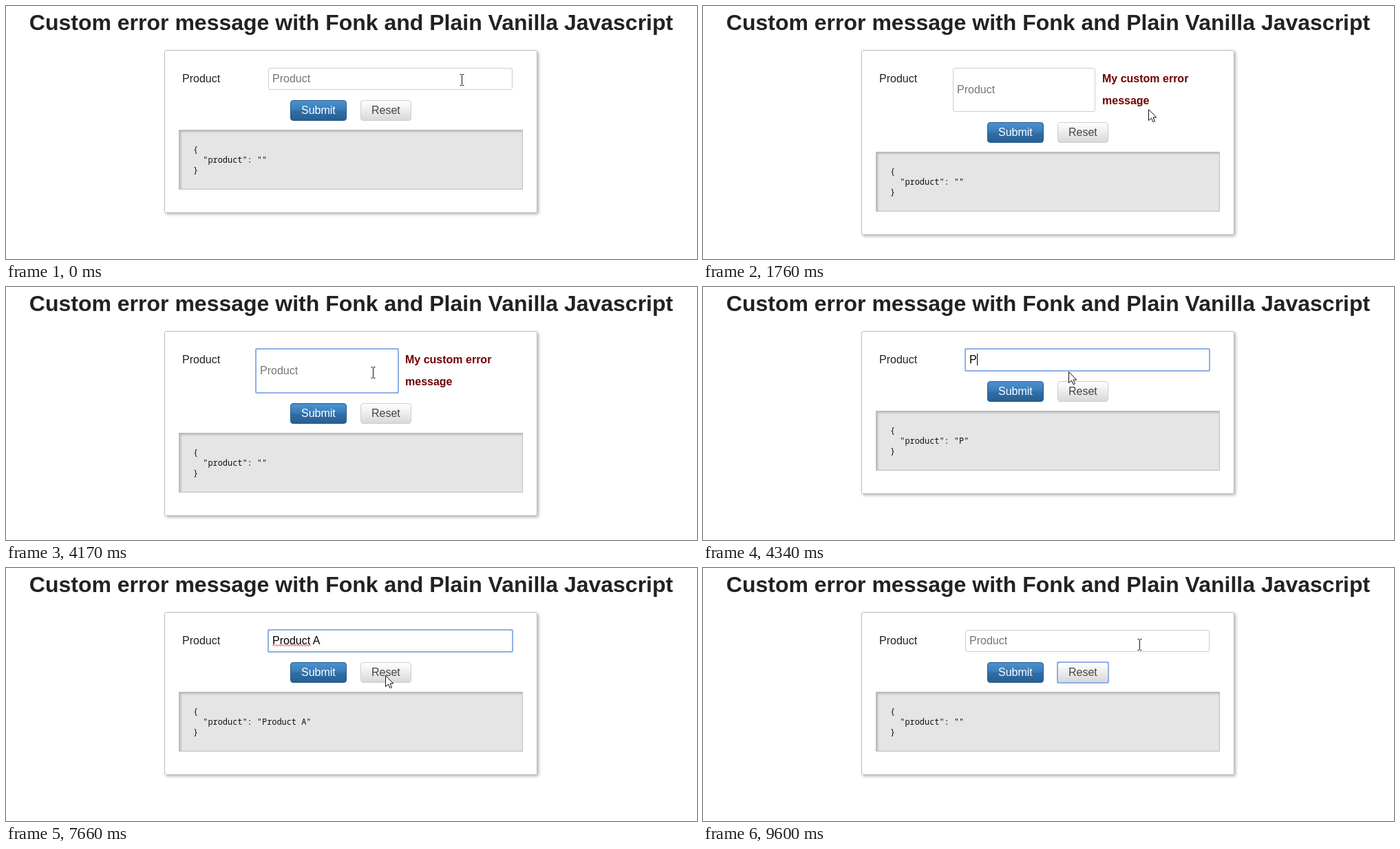
An HTML page for the animation above (9770 ms loop, 1004x368 px).

```html
<!DOCTYPE html>
<html lang="en">
<head>
<meta charset="utf-8">
<title>Custom error message</title>
<style>
html, body { margin: 0; width: 100%; height: 100%; overflow: hidden; background: #fff; }
body { position: relative; }
div, svg { position: absolute; box-sizing: border-box; }
#card { left: 230px; top: 64px; width: 542px; border: 1px solid #bfbfbf; border-radius: 3px; box-shadow: 2px 2px 4px rgba(0,0,0,.3); }
#field { top: 90px; border: 1px solid #ccc; border-radius: 3px; }
.focus::after { content: ""; position: absolute; inset: -2px; border: 2px solid #8db0ea; border-radius: 2px; }
#lower { left: 0; top: 0; }
.button { top: 137px; height: 30px; border: 1px solid; border-radius: 4px; }
#submit { left: 413px; width: 82px; border-color: #24598a; background: linear-gradient(#4a92d0, #3a7cb8 45%, #2f6da6 55%, #295f92); }
#reset { left: 515px; width: 74px; border-color: #ccc; background: linear-gradient(#fff, #d9d9d9); }
#output { left: 251px; top: 180px; width: 500px; height: 87px; background: #e5e5e5; border: 1px solid #bdbdbd; box-shadow: inset 2px 2px 3px rgba(0,0,0,.2); }
svg { left: 0; top: 0; }
text { font: 16px "Liberation Sans", Arial, sans-serif; white-space: pre; fill: #222; }
#title { font-size: 32px; font-weight: bold; }
#error text { font-weight: bold; fill: #700000; }
#json text { font: 11.92px "Noto Sans Mono", Consolas, monospace; fill: #111; }
</style>
</head>
<body>
<div id="card"></div>
<div id="field"></div>
<div id="lower">
  <div id="submit" class="button"></div>
  <div id="reset" class="button"></div>
  <div id="output"></div>
</div>
<svg width="1004" height="368" viewBox="0 0 1004 368">
  <text id="title" x="501.5" y="35" text-anchor="middle">Custom error message with Fonk and Plain Vanilla Javascript</text>
  <text x="256" y="111">Product</text>
  <text id="value"></text>
  <path id="squiggle" fill="none" stroke="#e8262a"/>
  <rect id="caret" width="1" height="17"/>
  <g id="error">
    <text x="580" y="111">My custom error</text>
    <text x="580" y="143">message</text>
  </g>
  <g id="json">
    <text x="429" y="157" style="font:16px 'Liberation Sans',Arial,sans-serif;fill:#fff">Submit</text>
    <text x="531" y="157" style="font:16px 'Liberation Sans',Arial,sans-serif;fill:#444">Reset</text>
    <text x="272" y="213">{</text>
    <text id="pair" x="272" y="228"></text>
    <text x="272" y="243">}</text>
  </g>
  <path id="arrow" d="M0 0V16L4 12.5L6.5 18.2L9 17.2L6.6 11.5H11.3Z" fill="#fff" stroke="#111"/>
  <path id="beam" d="M-3-8h2l1 1l1-1h2M0-7V7M-3 8h2l1-1l1 1h2" fill="none" stroke="#111"/>
</svg>
<script>
const LOOP = 9770, TEXT = "Product A";
const keyTimes = [4340, 4640, 4810, 4960, 5110, 5190, 5420, 5650, 6110];
const caretOn = [[990, 1530], [2540, 3090], [3620, 4170], [4340, 6660], [7190, 7660], [8210, 8290]];

// Pointer moves: first step, last step, step count, waypoints
const moves = [
  [1220, 1530, 5, [[662, 107], [649, 151]]],
  [2080, 2460, 6, [[649, 151], [533, 124]]],
  [6660, 7350, 10, [[533, 124], [540, 95], [596, 169], [553, 157]]],
  [8440, 9130, 10, [[553, 157], [634, 113]]],
  [9530, 9600, 2, [[634, 113], [634, 111]]],
];

const $ = id => document.getElementById(id);
const show = (id, on) => $(id).style.display = on ? "" : "none";
const within = (t, a, b) => t >= a && t < b;

function pointer(t) {
  const move = moves.findLast(m => t >= m[0]);
  if (!move) return moves[0][3][0];
  const [start, end, count, points] = move;
  const step = Math.min(count, 1 + Math.floor((t - start) / (end - start) * (count - 1)));
  const u = step / count;
  const along = (1 - Math.cos(Math.PI * u)) / 2 * (points.length - 1);
  const i = Math.min(points.length - 2, Math.floor(along));
  return points[i].map((p, k) => Math.round(p + (points[i + 1][k] - p) * (along - i)));
}

function draw(t) {
  const failed = within(t, 1760, 4340);
  const typed = t < 8440 ? TEXT.slice(0, keyTimes.filter(k => t >= k).length) : "";
  const drop = failed ? 32 : 0;
  const left = failed ? 363 : 381, width = failed ? 207 : 355, height = 32 + drop;

  $("card").style.height = 237 + drop + "px";
  Object.assign($("field").style, { left: left + "px", width: width + "px", height: height + "px" });
  $("field").className = within(t, 990, 1760) || within(t, 2540, 8290) ? "focus" : "";
  $("reset").classList.toggle("focus", t >= 8290);
  $("lower").style.top = drop + "px";
  $("json").setAttribute("transform", `translate(0 ${drop})`);
  $("pair").textContent = `  "product": "${typed}"`;
  show("error", failed);

  const value = $("value");
  value.textContent = typed || "Product";
  value.style.fill = typed ? "#000" : "#757575";
  value.setAttribute("x", left + 6);
  value.setAttribute("y", 111 + drop / 2);
  show("squiggle", typed.length > 7);

  const advance = typed ? value.getComputedTextLength() : 0;
  $("caret").setAttribute("x", Math.round(left + 6 + advance));
  $("caret").setAttribute("y", (typed ? 97 : 98) + drop / 2);
  show("caret", caretOn.some(([a, b]) => within(t, a, b)));

  const [x, y] = pointer(t);
  const inField = within(x, left, left + width) && within(y, 90, 90 + height);
  show("beam", inField);
  show("arrow", !inField);
  $("beam").setAttribute("transform", `translate(${x + .5} ${y + .5})`);
  $("arrow").setAttribute("transform", `translate(${x - 1.5} ${y - .5})`);
}

$("squiggle").setAttribute("d", "M387 113.5" + "l2-2l2 2".repeat(14));
const begin = performance.now();
function tick() {
  draw((performance.now() - begin) % LOOP);
  requestAnimationFrame(tick);
}
tick();
</script>
</body>
</html>
```
